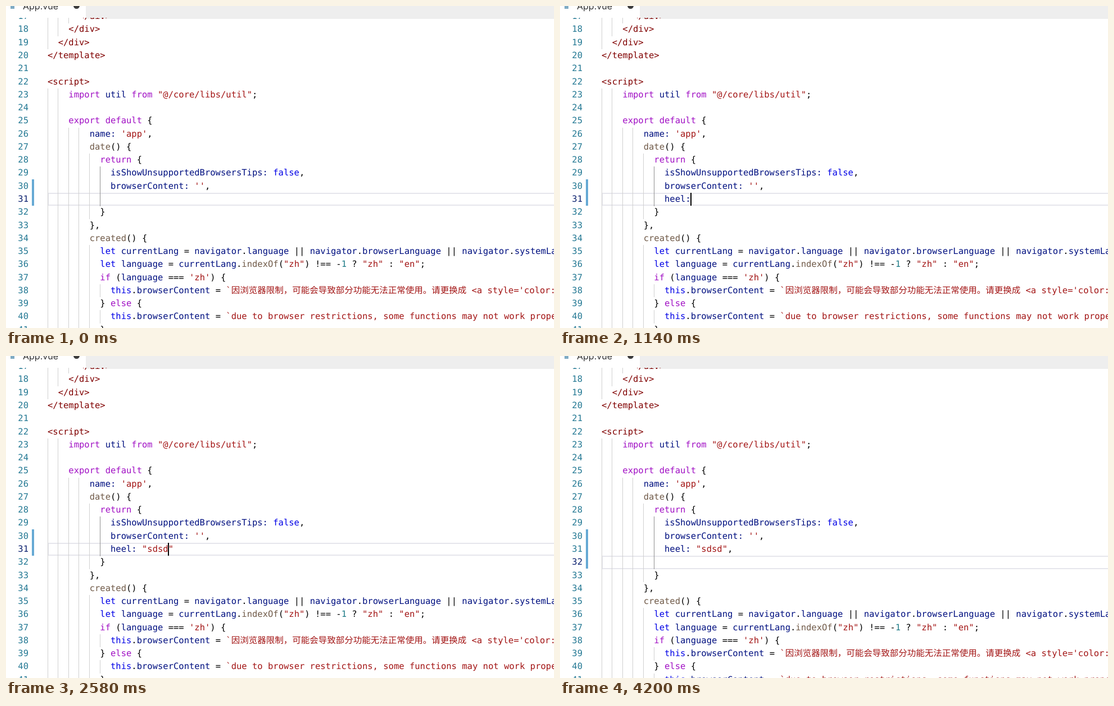
Write an HTML page that moves like this. It is 975 px wide and 574 px high and loops after 4.26 s.

```html
<!DOCTYPE html>
<html lang="en">
<head>
<meta charset="utf-8">
<title>Code editor typing</title>
<style>
html, body { margin: 0; width: 100%; height: 100%; overflow: hidden; background: #fff; }
#stage {
  position: absolute; left: 0; top: 0; width: 975px; height: 574px; overflow: hidden;
  font: 15.5px/23.27px "DejaVu Sans Mono", "Noto Sans CJK SC", "Noto Sans CJK", monospace;
  text-rendering: geometricPrecision; font-variant-ligatures: none; color: #000; background: #fff;
}
#stage div { position: absolute; white-space: pre; box-sizing: border-box; }
#bar { left: 142px; top: 0; width: 833px; height: 23px; background: #eeeeee; }
#mark { left: 8px; top: 0; width: 7px; height: 5px; background: #7fabc4; }
#title { left: 30px; top: -12px; font: 16px/24px Inter, "Liberation Sans", sans-serif; color: #333; }
#dot { left: 120px; top: -6px; width: 11px; height: 11px; border-radius: 50%; background: #3c3c3c; }
#code, #over { left: 0; top: 0; width: 975px; height: 574px; }
#code { clip-path: inset(21px 0 0 0); }
.num { left: 0; width: 40px; text-align: right; color: #237893; }
.num.on { color: #0b216f; }
.guide { width: 1px; background: #d0d0d0; }
.guide.on { background: #8f8f8f; }
.row { left: 74px; width: 1000px; height: 23.27px; border: 2px solid #e6e6ec; }
.edit { left: 46px; width: 4px; background: #66a9d4; }
.caret { width: 2.5px; height: 23.3px; background: #000; }
.box { background: #eeeff1; border: 1px solid #c4c5c8; overflow: hidden; }
.pick { background: #e4e9ee; }
.icon { width: 17px; height: 17px; border: 1px solid #4a4a4a; border-bottom-style: dotted; }
.abc { font: 13px/23px "Liberation Sans", sans-serif; color: #333; }
b { color: #0f60b0; }
.p { color: #000; } .t { color: #800000; } .k { color: #a110c4; } .v { color: #001080; }
.n { color: #0000e6; } .s { color: #a31515; } .f { color: #705a48; } .d { color: #1c7a86; }
</style>
</head>
<body>
<div id="stage">
  <div id="bar"></div>
  <div id="mark"></div>
  <div id="title">App.vue</div>
  <div id="dot"></div>
  <div id="code"></div>
  <div id="over"></div>
</div>
<script>
const LOOP = 4260, CH = 9.333, PITCH = 23.27, LEFT = 74, FIRST = 17;

// "~x" switches to colour class x
const HEAD = [
  "      ~t</div>",
  "    ~t</div>",
  "  ~t</div>",
  "~t</template>",
  "",
  "~t<script>",
  "    ~kimport ~vutil ~kfrom ~s\"@/core/libs/util\"~p;",
  "    ",
  "    ~kexport default ~p{",
  "        ~vname: ~s'app'~p,",
  "        ~fdate~p() {",
  "          ~kreturn ~p{",
  "            ~visShowUnsupportedBrowsersTips: ~nfalse~p,",
  "            ~vbrowserContent: ~s''~p,"
];
const TAIL = [
  "          }",
  "        },",
  "        ~fcreated~p() {",
  "          ~nlet ~vcurrentLang ~p= ~vnavigator~p.~vlanguage ~p|| ~vnavigator~p.~vbrowserLanguage ~p|| ~vnavigator~p.~vsystemLanguage~p;",
  "          ~nlet ~vlanguage ~p= ~vcurrentLang~p.~findexOf~p(~s\"zh\"~p) !== -~d1 ~p? ~s\"zh\" ~p: ~s\"en\"~p;",
  "          ~kif ~p(~vlanguage ~p=== ~s'zh'~p) {",
  "            ~nthis~p.~vbrowserContent ~p= ~s`因浏览器限制，可能会导致部分功能无法正常使用。请更换成 <a style='color:",
  "          ~p} ~kelse ~p{",
  "            ~nthis~p.~vbrowserContent ~p= ~s`due to browser restrictions, some functions may not work properly",
  "          }"
];

// "*x*" is a highlighted match
const HEE = {
  w: 555, abc: true, text: 32, icon: 10, pick: true,
  rows: ["*He*lv*e*tica", "jq*He*ightG*e*t", "jq*He*ightS*e*t", "fa4-*he*ad*e*r",
    "fa5-hire-a-*he*lp*e*r", "fa5p-football-*he*lm*e*t", "fa5p-*he*lm*e*t-battle",
    "fa5p-hire-a-*he*lp*e*r", "fa5-*he*ads*e*t", "fa5p-*he*ads*e*t"]
};
const SD = {
  w: 426, text: 33, icon: 11,
  rows: ["jq*S*lide*D*own", "jq*S*lide*D*ownFull", "fa5p-*s*un-*d*ust", "jq*S*li*d*eToggle",
    "jq*S*li*d*eToggleFull", "jq*S*li*d*eUp", "jq*S*li*d*eUpFull", "fa4-*s*ort-*d*esc",
    "fa5-*s*ort-*d*own", "fa5p-*s*ort-*d*own"],
  doc: ["Display the matched elements ", "ng motion. (jQuery Code Snipp", "$(selector).slideDown();"]
};

// start, typed text, caret column, popup
const STEPS = [
  [0, "", 0],
  [240, "h", 1],
  [420, "he", 2, HEE],
  [540, "hee", 3, HEE],
  [780, "heel", 4],
  [1020, "heel:", 5],
  [1440, "heel: ", 6],
  [1920, "heel: ~s\"\"", 7],
  [2220, "heel: ~s\"s\"", 8],
  [2340, "heel: ~s\"sd\"", 9, SD],
  [2460, "heel: ~s\"sds\"", 10],
  [2580, "heel: ~s\"sdsd\"", 11],
  [3000, "heel: ~s\"sdsd\"", 12],
  [3240, "heel: ~s\"sdsd\"~p,", 13],
  [3540, "heel: ~s\"sdsd\"~p,", 0]
];
const BREAK = 3540, MARKED = 3780;

const code = document.getElementById("code");
const over = document.getElementById("over");
const lineY = n => 333 + (n - 31) * PITCH;
const esc = s => s.replace(/&/g, "&amp;").replace(/</g, "&lt;");

function box(cls, x, y, w, h, inner = "") {
  const at = (k, v) => v == null ? "" : `${k}:${v}px;`;
  return `<div class="${cls}" style="${at("left", x)}${at("top", y)}${at("width", w)}${at("height", h)}">${inner}</div>`;
}

function paint(line) {
  const [plain, ...parts] = line.split("~");
  return esc(plain) + parts.map(p => `<span class="${p[0]}">${esc(p.slice(1))}</span>`).join("");
}

function editor(step, broken, marked) {
  const pad = " ".repeat(12);
  const lines = [...HEAD, pad + "~v" + step[1], ...(broken ? [pad] : []), ...TAIL];
  const active = broken ? 32 : 31;
  let html = box("row", null, lineY(active));
  lines.forEach((line, i) => {
    const n = FIRST + i, y = lineY(n), indent = line.match(/^ */)[0].length;
    for (let c = 0; c < indent; c += 2) {
      const on = c === 10 && n > 28 && n <= active;
      html += box("guide" + (on ? " on" : ""), Math.floor(LEFT + c * CH), y, null, PITCH + 0.3);
    }
    html += box(n === active ? "num on" : "num", null, y, null, null, n);
    html += box("", LEFT, y, null, null, paint(line));
  });
  return html + box("edit", null, 309, null, marked ? 70 : 46.5);
}

function popup(p, x) {
  const top = 356;
  let inner = "";
  if (p.pick) {
    inner += box("pick", 0, 0, p.w, 23.3);
    inner += `<div style="left:523px;top:0;width:18px;height:23px;background:#d5eaff"></div>`;
    inner += `<div style="left:540px;top:0;width:14px;height:83px;background:#bbb7b7"></div>`;
    inner += `<div style="left:540px;top:0;width:14px;height:23px;background:#8fa5be"></div>`;
  }
  p.rows.forEach((row, i) => {
    const y = i * PITCH;
    inner += p.abc && i === 0
      ? box("abc", 7, y - 0.5, null, null, "abc")
      : box("icon", p.icon - 1, y + 3.3, null, null);
    inner += box("", p.text - 1, y + 0.3, null, null, row.replace(/\*(.+?)\*/g, "<b>$1</b>"));
  });
  let html = box("box", x, top, p.w, 230, inner);
  if (p.doc) {
    const at = [6.2, 29.5, 73];
    const text = p.doc.map((s, i) =>
      `<div style="left:7px;top:${at[i]}px;color:${i < 2 ? "#444" : "#111"}">${s}</div>`).join("");
    html += box("box", x + p.w, top, 300, 103, text);
  }
  return html;
}

let shown = "";
function render(t) {
  const step = STEPS.filter(s => s[0] <= t).pop();
  const broken = t >= BREAK, marked = t >= MARKED;
  const lit = step[0] > 0 && (t - step[0]) % 1000 < 500;
  const key = [step[0], marked, lit].join();
  if (key === shown) return;
  shown = key;
  code.innerHTML = editor(step, broken, marked);
  const x = LEFT + (12 + step[2]) * CH;
  over.innerHTML = (step[3] ? popup(step[3], Math.round(x)) : "") +
    (lit ? box("caret", x - 1, lineY(broken ? 32 : 31)) : "");
}

const start = performance.now();
function tick() {
  render((performance.now() - start) % LOOP);
  requestAnimationFrame(tick);
}
tick();
</script>
</body>
</html>
```
